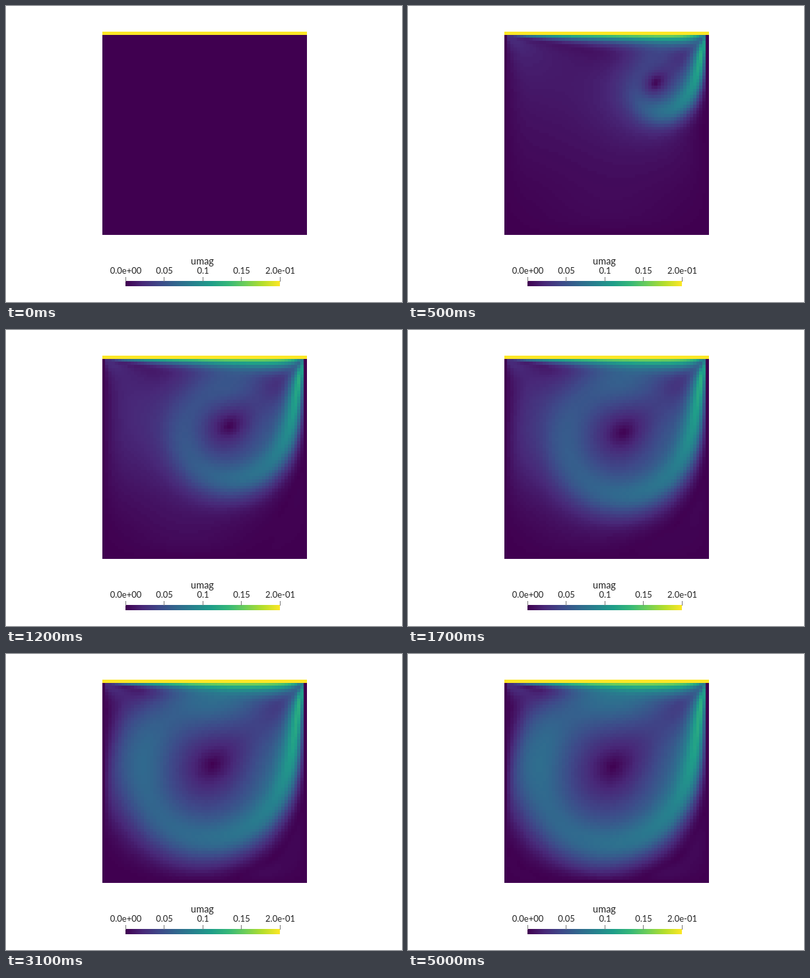
An HTML page with a canvas that plays this animation: 600 by 450 pixels, repeating every 5100 ms.

```html
<!DOCTYPE html>
<html lang="en">
<head>
<meta charset="utf-8">
<title>Lid-driven cavity</title>
<style>
  html, body { margin: 0; width: 100%; height: 100%; overflow: hidden; background: #fff; }
  canvas { display: block; }
</style>
</head>
<body>
<canvas id="stage" width="600" height="450"></canvas>
<script>
const N = 64, NODES = N * N, LAST = N - 1;
const FRAMES = 51, FRAME_MS = 100;
const VIRIDIS = ['#400050', '#482878', '#3e4989', '#31688e', '#26828e',
                 '#1f9e89', '#35b779', '#6ece58', '#b5de2b', '#fde725'];

// ---- Flow: vorticity and stream function, in units of grid step and lid speed ----
const VISCOSITY = LAST / 1000;        // Reynolds number 1000
const DT = 0.3, SNAP_STEPS = 20, MAX_SNAPS = 600;
const SWEEPS = 8, OVER_RELAX = 2 / (1 + Math.sin(Math.PI / LAST));

const psi = new Float64Array(NODES), vort = new Float64Array(NODES);
let rate = new Float64Array(NODES), oldRate = new Float64Array(NODES);

function forInterior(visit) {
  for (let y = 1; y < LAST; y++) for (let x = 1; x < LAST; x++) visit(y * N + x);
}

function setWalls() {
  for (let i = 1; i < LAST; i++) {
    const bottom = LAST * N + i, left = i * N, right = left + LAST;
    vort[i] = -2 * psi[i + N] - 2;    // moving lid
    vort[bottom] = -2 * psi[bottom - N];
    vort[left] = -2 * psi[left + 1];
    vort[right] = -2 * psi[right - 1];
  }
}

// Energy-conserving (Arakawa) advection plus diffusion
function findRate(p) {
  const n = p - N, s = p + N, e = p + 1, w = p - 1;
  const pn = psi[n], ps = psi[s], pe = psi[e], pw = psi[w];
  const pne = psi[n + 1], pnw = psi[n - 1], pse = psi[s + 1], psw = psi[s - 1];
  const vn = vort[n], vs = vort[s], ve = vort[e], vw = vort[w];
  const advection =
    (ve - vw) * (pn - ps) - (vn - vs) * (pe - pw) +
    ve * (pne - pse) - vw * (pnw - psw) - vn * (pne - pnw) + vs * (pse - psw) +
    vort[n + 1] * (pn - pe) - vort[n - 1] * (pn - pw) -
    vort[s - 1] * (pw - ps) + vort[s + 1] * (pe - ps);
  rate[p] = VISCOSITY * (vn + vs + ve + vw - 4 * vort[p]) - advection / 12;
}

function advance(p) {
  vort[p] += DT * (1.5 * rate[p] - 0.5 * oldRate[p]);
}

function relax(p) {
  const mean = (psi[p - 1] + psi[p + 1] + psi[p - N] + psi[p + N] + vort[p]) / 4;
  psi[p] += OVER_RELAX * (mean - psi[p]);
}

function step() {
  setWalls();
  forInterior(findRate);
  forInterior(advance);
  [rate, oldRate] = [oldRate, rate];
  for (let i = 0; i < SWEEPS; i++) forInterior(relax);
}

function speeds() {
  const result = new Float32Array(NODES).fill(1, 0, N);
  forInterior(p => {
    result[p] = Math.hypot(psi[p - N] - psi[p + N], psi[p + 1] - psi[p - 1]) / 2;
  });
  return result;
}

// Column minus row of the vortex eye, refined between nodes
function eyeOffset() {
  let eye = N + 1;
  forInterior(p => { if (psi[p] < psi[eye]) eye = p; });
  const shift = d => {
    const before = psi[eye - d], after = psi[eye + d];
    return (before - after) / 2 / (before - 2 * psi[eye] + after);
  };
  return eye % N + shift(1) - Math.floor(eye / N) - shift(N);
}

// Run to the last frame; the pace is set by where the eye is after nine frames
const snaps = [];
let pace = 0;
while (snaps.length < MAX_SNAPS && !(pace && snaps.length > pace * FRAMES)) {
  snaps.push(speeds());
  if (!pace && snaps.length > 26 && eyeOffset() <= 22) pace = (snaps.length - 1) / 9;
  for (let i = 0; i < SNAP_STEPS; i++) step();
}
pace = pace || 6.5;

// ---- Drawing ----
const ctx = document.getElementById('stage').getContext('2d');

function makeLayer(width, height) {
  const canvas = document.createElement('canvas');
  canvas.width = width;
  canvas.height = height;
  return canvas.getContext('2d');
}

function fillViridis(c, x, y, w, h) {
  const gradient = c.createLinearGradient(x, 0, x + w, 0);
  VIRIDIS.forEach((color, i) => gradient.addColorStop(i / (VIRIDIS.length - 1), color));
  c.fillStyle = gradient;
  c.fillRect(x, y, w, h);
}

const paletteLayer = makeLayer(256, 1);
fillViridis(paletteLayer, 0, 0, 256, 1);
const palette = new Uint32Array(paletteLayer.getImageData(0, 0, 256, 1).data.buffer);

const field = makeLayer(N, N);
const image = field.createImageData(N, N);
const pixels = new Uint32Array(image.data.buffer);

function drawLegend() {
  const left = 181, width = 234;
  fillViridis(ctx, left, 418, width, 8);
  ctx.fillStyle = '#222';
  ctx.textAlign = 'center';
  ctx.font = '14.5px Lato, sans-serif';
  ctx.fillText('umag', 297.5, 392.5);
  ctx.font = '13px Lato, sans-serif';
  ['0.0e+00', '0.05', '0.1', '0.15', '2.0e-01'].forEach((label, i) => {
    const x = left + width * i / 4;
    ctx.fillStyle = '#222';
    ctx.fillText(label, x + 0.5, 407);
    ctx.fillStyle = '#777';
    ctx.fillRect(Math.floor(x), 412, 1, 7);
  });
}

function drawField(frame) {
  const speed = snaps[Math.min(Math.round(frame * pace), snaps.length - 1)];
  for (let p = 0; p < NODES; p++) {
    pixels[p] = palette[Math.min(255, Math.round(speed[p] * 255))];
  }
  field.putImageData(image, 0, 0);
  ctx.imageSmoothingEnabled = false;
  ctx.drawImage(field.canvas, 145.5, 38.7, 310.4, 309);
}

const start = performance.now();
function render() {
  const frame = Math.floor((performance.now() - start) / FRAME_MS) % FRAMES;
  ctx.fillStyle = '#fff';
  ctx.fillRect(0, 0, 600, 450);
  drawField(frame);
  drawLegend();
  requestAnimationFrame(render);
}
render();
</script>
</body>
</html>
```
